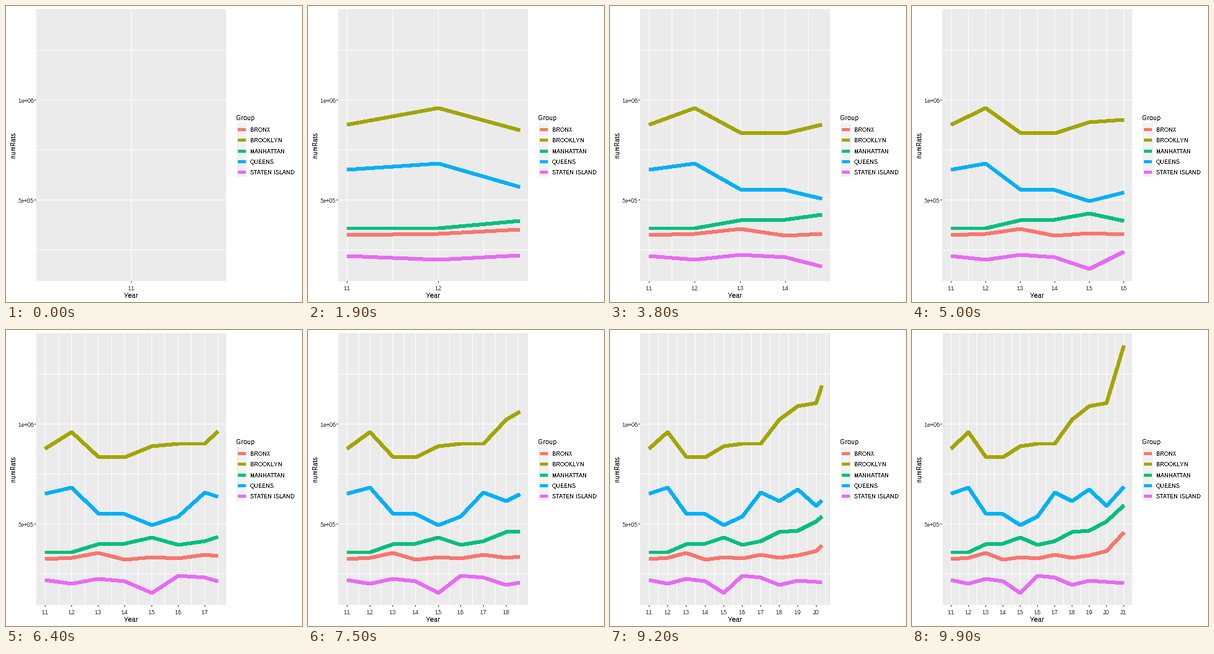
Write a matplotlib script that moves like this. It is 480 by 480 pixels and loops after 10000 ms.

```python
import matplotlib.pyplot as plt
import numpy as np
from matplotlib.animation import FuncAnimation
from matplotlib.patches import Rectangle

SIZE, DPI = 480, 72  # at 72 dpi one point is one pixel
FRAMES, INTERVAL = 100, 100

LEFT, TOP, RIGHT, BOTTOM = 49, 5, 357, 446  # panel
X0, X1 = 63.2, 343.2  # first and newest data point

YEARS = np.arange(11, 22)
# Frame at which each year is reached, spread evenly over the loop
KEYS = ((FRAMES - 1) * np.arange(len(YEARS)) + 5) // (len(YEARS) - 1)

# Yearly counts in thousands
GROUPS = {
    "BRONX": ("#F8766D", [324, 331, 355, 321, 334, 328, 346, 331, 343, 364, 457]),
    "BROOKLYN": ("#A3A500", [877, 960, 837, 834, 889, 902, 902, 1022, 1090, 1105, 1392]),
    "MANHATTAN": ("#00BF7D", [358, 358, 398, 402, 432, 395, 414, 460, 466, 513, 593]),
    "QUEENS": ("#00B0F6", [652, 682, 553, 550, 494, 537, 658, 615, 673, 590, 685]),
    "STATEN ISLAND": ("#E76BF3", [219, 201, 226, 213, 155, 241, 232, 195, 216, 210, 204]),
}

plt.rcParams.update({
    "font.family": "Liberation Sans",
    "text.hinting": "native",
    "text.hinting_factor": 1,
    "text.antialiased": False,
})
fig = plt.figure(figsize=(SIZE / DPI, SIZE / DPI), dpi=DPI, facecolor="white")
ax = fig.add_axes([0, 0, 1, 1])
ax.set_xlim(-0.5, SIZE - 0.5)  # whole numbers fall on pixel centres
ax.set_ylim(SIZE - 0.5, -0.5)
ax.axis("off")


def to_y(count):
    return np.floor(152.6 + 0.324 * (1000 - np.asarray(count)))


def box(x, y, w, h, color):
    return ax.add_patch(Rectangle((x - 0.5, y - 0.5), w, h, fc=color, lw=0,
                                  antialiased=False))


def line(xs, ys, color, width=1, z=2):
    return ax.plot(xs, ys, color=color, lw=width, zorder=z, antialiased=False,
                   snap=False, solid_capstyle="butt", solid_joinstyle="round")[0]


def label(x, y, text, size=9, color="black", ha="left", **kw):
    return ax.text(x, y, text, fontsize=size, color=color, ha=ha,
                   va="baseline", **kw)


def strokes(cols, top, bottom):
    """Vertical strokes at the given columns as one broken line."""
    return np.repeat(cols, 3), np.tile([top, bottom, np.nan], len(cols))


panel = box(LEFT, TOP, RIGHT - LEFT, BOTTOM - TOP, "#EBEBEB")
for count in range(250, 1500, 250):
    y = to_y(count)
    line([LEFT - 0.5, RIGHT - 0.5], [y, y], "white")
    if count in (500, 1000):
        line([LEFT - 3.5, LEFT - 0.5], [y, y], "#333333")
        label(44.5, y + 4.5, f"{count * 1000:.0e}", color="#4D4D4D", ha="right")

label(202.5, 472.5, "Year", 11, ha="center")
label(14.5, 224.5, "numRats", 11, ha="center", rotation=90, rotation_mode="anchor")

label(373, 184.5, "Group", 11)
box(374, 190, 17, 87, "#F2F2F2")
for i, (name, (color, _)) in enumerate(GROUPS.items()):
    y = round(200 + 17.28 * i)
    line([375.5, 388.5], [y, y], color, 5)
    label(395.5, y + 3.5, name)

grid = line([], [], "white")
ticks = line([], [], "#333333")
curves = [line([], [], color, 5, 3) for color, _ in GROUPS.values()]
for artist in [grid, *curves]:
    artist.set_clip_path(panel)
year_labels = [label(0, 460.5, str(y), color="#4D4D4D", ha="center") for y in YEARS]


def update(frame):
    now = np.interp(frame, KEYS, YEARS)
    span = now - YEARS[0]

    def to_x(year):
        part = (year - YEARS[0]) / span if span else 0.5 + 0 * year
        return np.round(X0 + (X1 - X0) * part)

    # The view reaches 5 % beyond the data on both sides
    pad = 0.05 * span + 1e-9
    major = YEARS[YEARS <= now + pad]
    minor = np.arange(YEARS[0] - 0.5, YEARS[-1] + 1)
    inside = (minor >= YEARS[0] - pad) & (minor <= now + pad)
    minor = minor[inside & (len(major) > 1)]

    grid.set_data(*strokes(to_x(np.append(major, minor)), TOP - 0.5, BOTTOM - 0.5))
    ticks.set_data(*strokes(to_x(major), BOTTOM - 0.5, BOTTOM + 2.5))
    for year, text in zip(YEARS, year_labels):
        text.set_visible(year in major)
        if year in major:
            text.set_x(to_x(year) - 0.5)

    shown = np.append(YEARS[YEARS < now], now) if span else YEARS[:0]
    for curve, (_, counts) in zip(curves, GROUPS.values()):
        curve.set_data(to_x(shown), to_y(np.interp(shown, YEARS, counts)))
    return [grid, ticks, *curves, *year_labels]


anim = FuncAnimation(fig, update, frames=FRAMES, interval=INTERVAL,
                     repeat=True, repeat_delay=0, blit=False)
plt.show()
```
